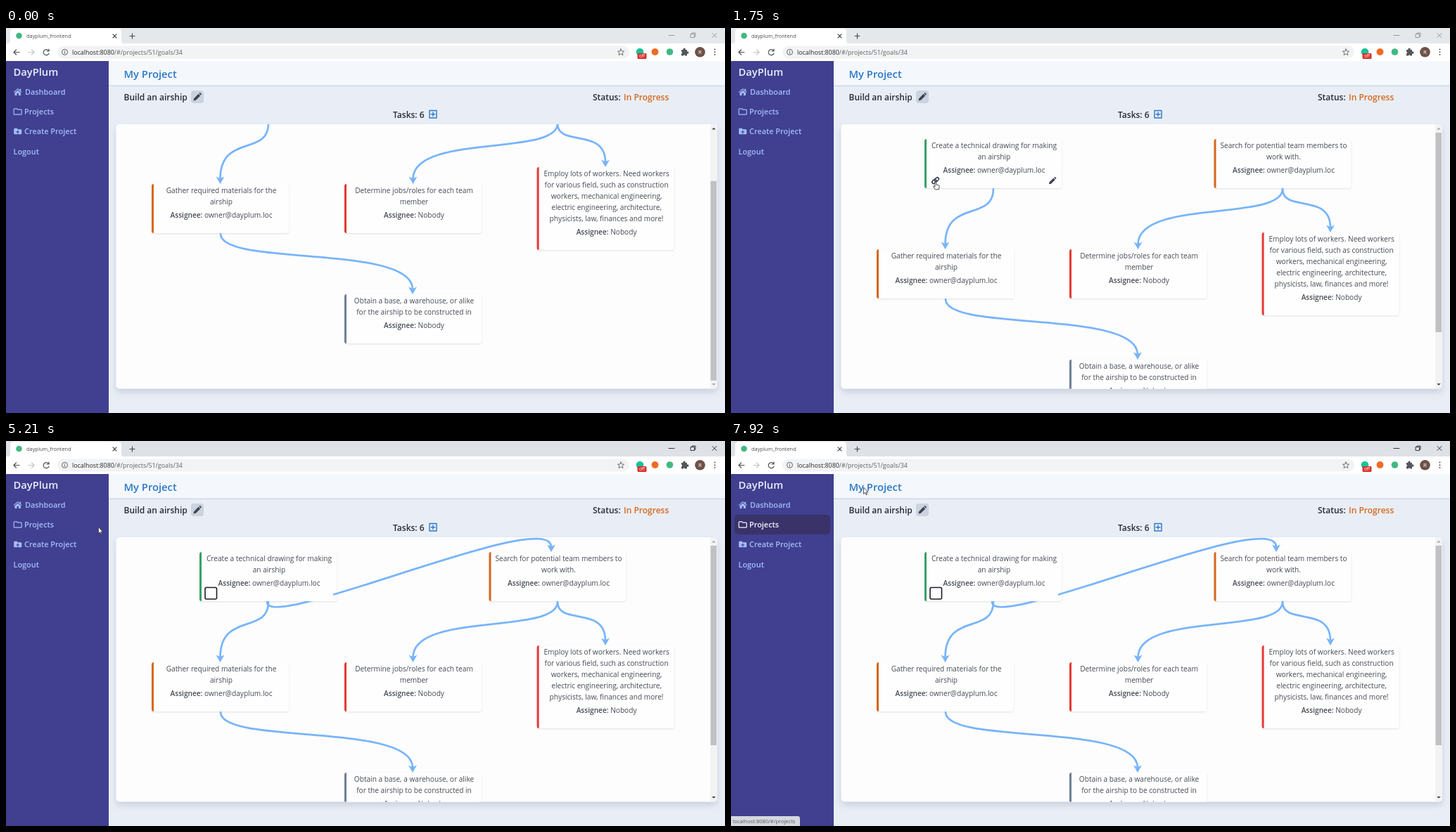
An HTML page that plays this animation: 1022x548 px, repeating every 8 s.

```html
<!DOCTYPE html>
<html lang="en">
<head>
<meta charset="utf-8">
<title>Task board</title>
<style>
html, body { margin: 0; width: 100%; height: 100%; overflow: hidden; background: #e9eef6; }
svg { display: block; width: 100%; height: 100%; font-family: "Open Sans", "Noto Sans", sans-serif; }
.semi { font-weight: 600; }
.card { filter: drop-shadow(0 1px 1px rgba(30, 40, 70, .13)); }
.panel { filter: drop-shadow(0 5px 5px rgba(30, 40, 80, .15)); }
.line { fill: none; stroke-linecap: round; stroke-linejoin: round; }
</style>
</head>
<body>
<svg id="stage" viewBox="0 0 1022 548"></svg>
<script>
const LOOP = 8000, MAX_SCROLL = 93;
const BLUE = '#2c78c8', DARK = '#3c4353', GREEN = '#38a169', ORANGE = '#d6681f', RED = '#e53935';

// ---- drawing helpers ----
const rect = (x, y, w, h, fill, rx = 0, more = '') =>
  `<rect x="${x}" y="${y}" width="${w}" height="${h}" rx="${rx}" fill="${fill}" ${more}/>`;
const text = (x, y, size, fill, s, more = '') =>
  `<text x="${x}" y="${y}" font-size="${size}" fill="${fill}" ${more}>${s}</text>`;
const semi = (x, y, size, fill, s) => text(x, y, size, fill, s, 'class="semi"');
const line = (d, color, w = 1.2) =>
  `<path class="line" d="${d}" stroke="${color}" stroke-width="${w}"/>`;
const shape = (d, fill) => `<path d="${d}" fill="${fill}"/>`;
const dot = (x, y, r, fill) => `<circle cx="${x}" cy="${y}" r="${r}" fill="${fill}"/>`;
const at = (x, y, s, id = '') => `<g ${id && `id="${id}"`} transform="translate(${x} ${y})">${s}</g>`;
const group = (id, s) => `<g id="${id}">${s}</g>`;

// ---- icons, centred on 0,0 ----
const pencil = shape('M-5.5 5.5L-4.8 2.2L1.6-4.2L4.2-1.6L-2.2 4.8ZM2.3-4.9L3.3-5.7Q3.9-6 4.5-5.5L5.5-4.5Q6-3.9 5.6-3.3L4.9-2.3Z', DARK);
const link = color => `<g transform="rotate(-45)" fill="none" stroke="${color}" stroke-width="1.6">
  <rect x="-5.6" y="-2.3" width="6.8" height="4.2" rx="2.1"/><rect x="-1.2" y="-1.7" width="6.8" height="4.2" rx="2.1"/></g>`;
const cross = line('M-2.6-2.6L2.6 2.6M2.6-2.6L-2.6 2.6', '#d9302c', 2);
const shade = rect(-8.5, -8.5, 17, 17, '#dae2ec', 3);
const focus = rect(-8, -8.5, 16.5, 16.5, 'none', 2, 'stroke="#1c1c24" stroke-width="1.6"');
const house = 'M-6 .3L0-5L2.8-2.5V-4.4H4.4V-1.1L6 .3L5.3 1.1L0-3.4L-5.3 1.1ZM-4.2 1.3L0-2.3L4.2 1.3V5H1.2V1.8H-1.2V5H-4.2Z';
const folder = 'M-5.5-3.2Q-5.5-4.2-4.5-4.2H-1.2L.3-2.8H4.5Q5.5-2.8 5.5-1.8V3.2Q5.5 4.2 4.5 4.2H-4.5Q-5.5 4.2-5.5 3.2Z';

// ---- browser ----
function browser() {
  const grey = '#5f6368';
  return rect(0, 0, 1022, 24, '#dee1e6', 0, 'id="strip"') +
    shape('M1 23Q6 23 6 18V6Q6 1 11 1H159Q164 1 164 6V18Q164 23 169 23Z', '#fff') +
    rect(0, 22, 1022, 25, '#fff') +
    dot(18.5, 11, 4.3, '#41b883') + text(29, 13.8, 7.4, '#45494d', 'dayplum_frontend') +
    line('M152 9L157 14M157 9L152 14', '#45494d', 1.1) +
    line('M176 11.5H183M179.5 8V15', '#45494d', 1.2) +
    group('controls', line('M942 10.5H950M973.5 8.5H978.5V13.5H973.5ZM975 8.5V7H980V12H978.5M1004 7.5L1010 13.5M1010 7.5L1004 13.5', 'currentColor', .9)) +
    line('M19 34.5H11M14.5 31L11 34.5L14.5 38', '#4d5156') +
    line('M32 34.5H40M36.5 31L40 34.5L36.5 38', '#c3c5c8') +
    line('M60.4 32.2A4 4 0 1 0 61 36M61 30V33H58', '#4d5156') +
    rect(73, 25.5, 813, 18, '#f1f3f4', 9) +
    `<circle cx="83.5" cy="34.3" r="4" fill="none" stroke="${grey}"/>` + line('M83.5 34V36.3M83.5 32.3V32.4', grey, 1) +
    `<text y="37.6" font-size="8.9" fill="${grey}" x="94"><tspan fill="#25272b">localhost:8080</tspan>/#/projects/51/goals/34</text>` +
    line('M874 29.8L875.3 32.9L878.6 33.2L876.1 35.3L876.9 38.6L874 36.8L871.1 38.6L871.9 35.3L869.4 33.2L872.7 32.9Z', grey, .9) +
    dot(901, 34, 5.3, '#15c39a') + rect(897.5, 36, 13, 8, '#d9302c', 1.5) +
    text(904, 42.4, 6.4, '#fff', 'off', 'text-anchor="middle"') +
    dot(922.5, 34, 5, '#ef6c25') + dot(943.5, 34, 4.8, '#41b883') +
    shape('M960 31H962.6A1.7 1.7 0 1 1 965.6 31H968V33.5A1.7 1.7 0 1 1 968 36.5V39.5H965.5A1.6 1.6 0 0 0 962.5 39.5H960V36.6A1.6 1.6 0 0 0 960 33.6Z', '#53575c') +
    dot(986.5, 34.3, 7.3, '#6d5148') + text(986.5, 37.3, 8, '#fff', 'R', 'text-anchor="middle"') +
    [30.5, 34.3, 38].map(y => dot(1007.5, y, .95, '#4d5156')).join('');
}

// ---- sidebar and headings ----
function navItem(key, y, x, label, icon) {
  return group(key, rect(5, y - 14, 136, 28, '#3a3369', 5, `id="${key}Hover"`) +
    at(16.7, y, icon) + semi(x, y + 4, 10.9, 'currentColor', label));
}
function sidebar() {
  return rect(0, 47, 146, 501, '#413f90') + semi(10.5, 68, 14.7, '#e9effc', 'DayPlum') +
    navItem('dash', 91, 27, 'Dashboard', shape(house, 'currentColor')) +
    navItem('proj', 119, 26, 'Projects', line(folder, 'currentColor', 1.2)) +
    navItem('create', 147, 26, 'Create Project', shape(folder, 'currentColor') + line('M0-1V3M-2 1H2', '#413f90', 1.2)) +
    semi(10.5, 179.5, 10.9, '#a3bffa', 'Logout');
}
function headings() {
  return rect(146, 47, 876, 35, '#f4f8fc') + rect(146, 81.6, 876, 1.3, '#c9d5e4') +
    semi(167.5, 70.7, 14.75, BLUE, 'My Project') +
    semi(167.5, 102.5, 12, '#262b36', 'Build an airship') +
    rect(263, 89, 18, 18, '#cbd3df', 4) + at(272, 98, pencil) +
    semi(834, 102.5, 12, '#262b36', 'Status:') + semi(878, 102.5, 12, ORANGE, 'In Progress') +
    semi(550, 127.5, 12, '#262b36', 'Tasks: 6') +
    line('M602 117.5H612V128H602ZM607 120V125.5M604.2 122.8H609.8', BLUE, 1.4);
}

// ---- board ----
const MAIL = 'owner@dayplum.loc', NOBODY = 'Nobody';
const cards = [
  [275, 158, 70, GREEN, MAIL, 'Create a technical drawing for making|an airship'],
  [686.5, 158, 70, ORANGE, MAIL, 'Search for potential team members to|work with.'],
  [207, 315, 70, ORANGE, MAIL, 'Gather required materials for the|airship'],
  [481, 315, 70, RED, NOBODY, 'Determine jobs/roles for each team|member'],
  [754.6, 291, 118, RED, NOBODY, 'Employ lots of workers. Need workers|for various field, such as construction|workers, mechanical engineering,|electric engineering, architecture,|physicists, law, finances and more!'],
  [481, 472, 70, '#718096', NOBODY, 'Obtain a base, a warehouse, or alike|for the airship to be constructed in'],
];
const cardBack = ([x, y, h]) => rect(x, y, 195, h, '#fefefe', 3, 'class="card"');
function cardFront([x, y, h, color, who, words]) {
  const rows = words.split('|'), mid = 'text-anchor="middle"', ink = '#454a54';
  return rect(x, y, 190, h, '#fefefe', 3) +
    shape(`M${x + 3} ${y}V${y + h}Q${x} ${y + h} ${x} ${y + h - 3}V${y + 3}Q${x} ${y} ${x + 3} ${y}Z`, color) +
    rows.map((s, i) => text(x + 99, y + 13 + 16 * i, 10.13, ink, s, mid)).join('') +
    text(x + 99, y + 16 + 16 * rows.length, 10.13, ink, `<tspan class="semi">Assignee:</tspan> ${who}`, mid);
}
// k1 and k2 are the vertical pulls at the two ends
function arrow(x1, y1, x2, y2, k1 = 47, k2 = 65) {
  const c = '#78b4fa', end = y2 - 7;
  return line(`M${x1} ${y1}C${x1} ${y1 + k1} ${x2} ${end - k2} ${x2} ${end}`, c, 2.7) +
    shape(`M${x2} ${y2}l-6-10.5l6 2.8l6-2.8Z`, c);
}
function board() {
  return `<clipPath id="box"><rect x="156.5" y="137" width="854.5" height="376.5" rx="5"/></clipPath>` +
    `<g class="panel">${rect(156.5, 137, 854.5, 376.5, '#fdfdfd', 5)}</g><g clip-path="url(#box)">` +
    group('page',
      cards.map(cardBack).join('') + group('newArrow', arrow(371, 229, 775, 158, 45, 59)) + cards.map(cardFront).join('') +
      at(290.5, 217, link(DARK), 'startLink') +
      at(290.5, 217, shade, 'crossShade') + at(290, 217.3, cross, 'cross') + at(291, 217, focus, 'crossFocus') +
      at(457, 217.3, `<g transform="scale(.92)">${pencil}</g>`, 'pencil1') +
      at(868, 217.3, `<g transform="scale(.92)">${pencil}</g>`, 'pencil2') +
      at(702.5, 217, shade, 'linkShade') + at(702.5, 217.2, focus, 'linkFocus') +
      group('links', [[702.5, 217], [497, 374], [771, 398]].map(([x, y]) => at(x, y, link(BLUE))).join(''))) +
    group('arrows', arrow(373, 229, 304.5, 315) + arrow(784, 229, 578.5, 315) +
      arrow(784, 229, 852, 291, 34, 50) + arrow(305, 386, 578, 472)) +
    rect(1001, 137, 10, 376.5, '#f3f3f4') + rect(1001.5, 149, 8.5, 284, '#c1c1c3', 0, 'id="thumb"') +
    `<path id="up" d="M1003.3 144.6L1006 141.8L1008.7 144.6Z"/><path id="down" d="M1003.3 506L1006 508.8L1008.7 506Z"/></g>`;
}
function bubble(id, w, path) {
  return group(id, shape(`M0 534H${w - 3}Q${w} 534 ${w} 537V548H0Z`, '#d6d8df') +
    text(2.5, 543.6, 7.5, '#55595e', 'localhost:8080/#/' + path));
}
const cursors = group('pointer', `<g stroke="#222" stroke-width=".8" fill="#fff" stroke-linejoin="round">
  <path id="tip" d="M0 0V9.3L2.1 7.4L3.6 10.6L5 10L3.6 6.9H6.4Z"/>
  <path id="hand" d="M-1 1Q-1 0 0 0T1 1V4.2L4.4 5Q5.3 5.3 5.2 6.3L4.4 10.8H-.6L-3.3 7Q-3.4 5.7-2.2 5.9L-1 7Z"/></g>`);

document.getElementById('stage').innerHTML = rect(0, 0, 1022, 548, '#e9eef6') + headings() + board() + sidebar() +
  browser() + bubble('dashBubble', 107, 'dashboard') + bubble('projBubble', 98, 'projects') + cursors;

// ---- motion ----
const el = id => document.getElementById(id);
const ease = p => (p = Math.min(1, Math.max(0, p)), p * p * (3 - 2 * p));
const scrollAt = t => MAX_SCROLL * (1 - ease((t - 435) / 200));

const path = [ // time, x, y of the pointer's tip
  [40, 520, 516], [290, 473, 211], [900, 473, 211], [1540, 291, 219], [1950, 291, 219], [2540, 702, 216],
  [2760, 702, 216], [3240, 330, 210], [3420, 285, 221], [4670, 285, 221], [5460, 84, 92], [5900, 84, 94],
  [6090, 90.5, 129], [6250, 88, 122], [6500, 64, 117], [7500, 64, 117], [7710, 188.5, 66], [LOOP, 188.5, 66]];
function pointerAt(t) {
  const i = Math.max(1, path.findIndex(k => k[0] >= t)), [a, b] = [path[i - 1], path[i]];
  const p = ease((t - a[0]) / (b[0] - a[0]));
  return [a[1] + (b[1] - a[1]) * p, a[2] + (b[2] - a[2]) * p];
}

const visible = { // spans of time in which each part shows
  pointer: [[40, LOOP]],
  hand: [[1500, 2060], [2470, 2830], [3330, 4760], [5330, 7920]],
  startLink: [[1440, 1800]],
  cross: [[1800, 4500]],
  crossShade: [[1800, 2060], [4250, 4500]],
  crossFocus: [[4500, LOOP]],
  pencil1: [[1440, 2240], [3190, 4740]],
  pencil2: [[2420, 3050]],
  linkShade: [[2460, 3050]],
  linkFocus: [[3050, 4500]],
  links: [[1800, 4500]],
  newArrow: [[3050, LOOP]],
  dashHover: [[5500, 6130]], dashBubble: [[5500, 6130]],
  projHover: [[6130, LOOP]], projBubble: [[6130, LOOP]],
  createHover: [],
};
const shows = (id, t) => visible[id].some(([a, b]) => t >= a && t < b);

function draw(t) {
  for (const id in visible) el(id).style.display = shows(id, t) ? '' : 'none';
  el('tip').style.display = shows('hand', t) ? 'none' : '';
  el('pointer').setAttribute('transform', `translate(${pointerAt(t)})`);
  for (const id of ['dash', 'proj', 'create']) el(id).style.color = shows(id + 'Hover', t) ? '#f2f6ff' : '#a3bffa';

  const s = scrollAt(t);
  el('page').setAttribute('transform', `translate(0 ${-s})`);
  el('arrows').setAttribute('transform', `translate(0 ${-scrollAt(t - 11)})`); // connectors trail the cards
  el('thumb').setAttribute('y', 149 + s * .74);
  el('up').setAttribute('fill', s > 0 ? '#444' : '#a5a5a5');
  el('down').setAttribute('fill', s < MAX_SCROLL ? '#444' : '#a5a5a5');

  const active = t >= 1790;
  el('strip').setAttribute('fill', active ? '#dee1e6' : '#e5e8eb');
  el('controls').style.color = active ? '#222' : '#8d9196';
}

const start = performance.now();
function tick() {
  draw((performance.now() - start) % LOOP);
  requestAnimationFrame(tick);
}
tick();
</script>
</body>
</html>
```
